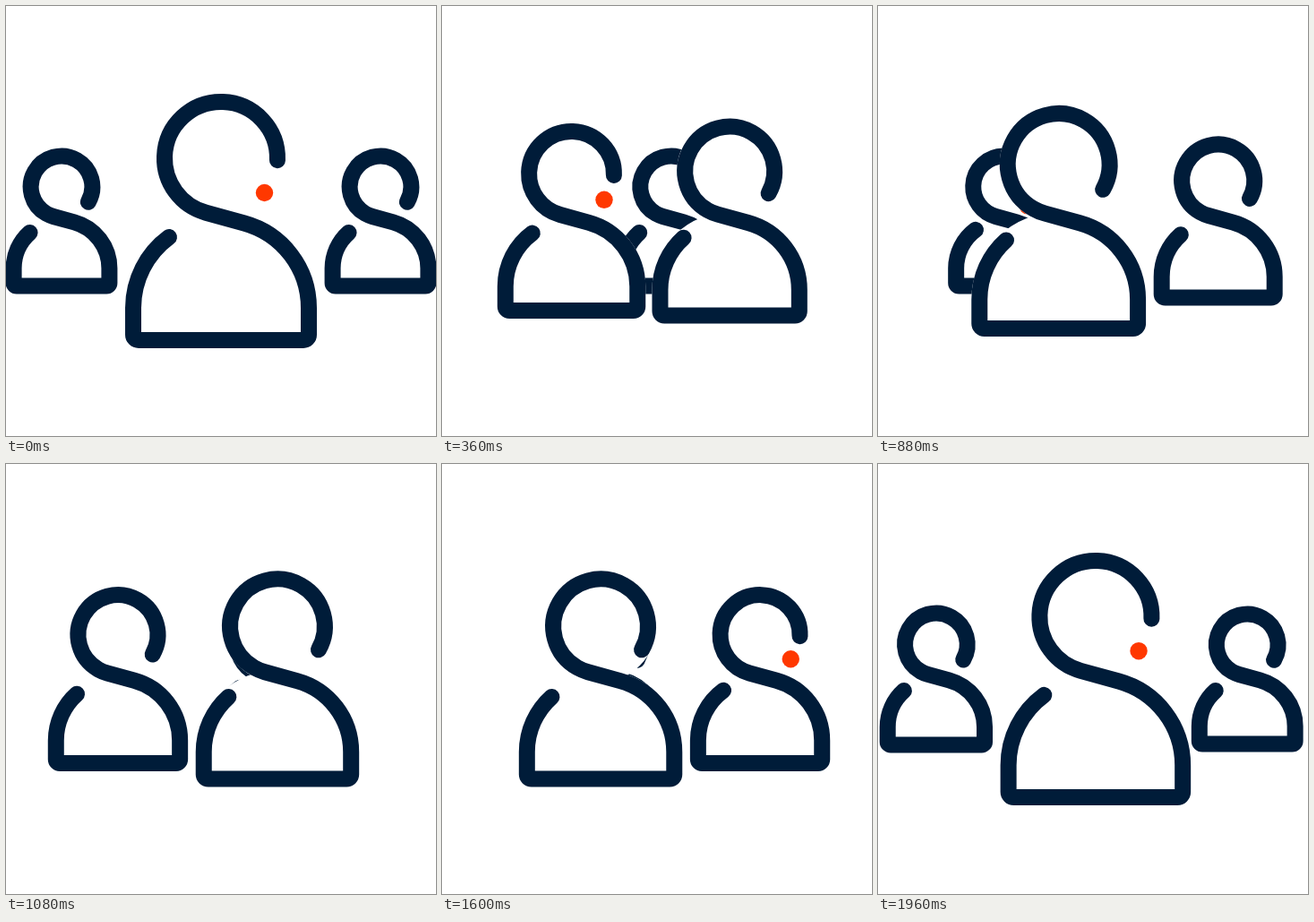
Animation, 480 px wide and 480 px high, one loop 2000 ms. Source, as an HTML page with a canvas:

```html
<!DOCTYPE html>
<html lang="en">
<head>
<meta charset="utf-8">
<title>Rotating team</title>
<style>
  html, body { margin: 0; width: 100%; height: 100%; overflow: hidden; background: #fff; }
  canvas { display: block; width: 480px; height: 480px; }
</style>
</head>
<body>
<canvas id="stage" width="480" height="480"></canvas>
<script>
const ctx = document.getElementById('stage').getContext('2d');
const NAVY = '#001c39', RED = '#ff3800', WHITE = '#fff';
const LOOP = 2000, STEP = 40, MID = 240, SMALL = 0.545;
const rad = deg => deg * Math.PI / 180;

// Figure measurements at full size, relative to its anchor
const HEAD = { y: -70, r: 63 };
const BODY = { y: 97, r: 98, base: 133, corner: 6 };
// Both circles share an inner tangent that forms the neck
const neck = Math.acos((HEAD.r + BODY.r) / (BODY.y - HEAD.y));

// Slots are visited in the order centre, left, right
const people = [
  { first: 0, xs: [240, 64.5, 418], headEnd: rad(2), armEnd: rad(233.7), dot: true },
  { first: 1, xs: [240, 62, 418], headEnd: rad(29.5), armEnd: rad(228.4) },
  { first: 2, xs: [240, 62, 418], headEnd: rad(29.5), armEnd: rad(228.4) }
];
const sizes = [1, SMALL, SMALL];

const legs = [
  { until: 680, start: 0, span: 680 },
  { until: 1340, start: 680, span: 668 },
  { until: LOOP, start: 1324, span: 688 }
];

const mix = (a, b, p) => a + (b - a) * p;
const smooth = u => u * u * (3 - 2 * u);

function base(x, s) {
  const r = BODY.r * s, bottom = MID + BODY.base * s, c = BODY.corner * s;
  ctx.arcTo(x + r, bottom, x - r, bottom, c);
  ctx.arcTo(x - r, bottom, x - r, MID + BODY.y * s, c);
}

function drawPerson(person, x, s) {
  const headY = MID + HEAD.y * s, headR = HEAD.r * s;
  const bodyY = MID + BODY.y * s, bodyR = BODY.r * s;

  // White backing hides whoever walks behind
  ctx.fillStyle = ctx.strokeStyle = WHITE;
  ctx.beginPath();
  ctx.arc(x, headY, headR, 0, Math.PI * 2);
  ctx.fill();
  ctx.stroke();
  ctx.beginPath();
  ctx.arc(x, bodyY, bodyR, Math.PI, Math.PI * 2);
  base(x, s);
  ctx.closePath();
  ctx.fill();
  ctx.stroke();

  ctx.strokeStyle = NAVY;
  ctx.beginPath();
  ctx.arc(x, headY, headR, person.headEnd, Math.PI / 2 + neck, true);
  ctx.arc(x, bodyY, bodyR, neck - Math.PI / 2, 0);
  base(x, s);
  ctx.arc(x, bodyY, bodyR, Math.PI, person.armEnd);
  ctx.stroke();

  if (person.dot) {
    ctx.fillStyle = RED;
    ctx.beginPath();
    ctx.arc(x + 48.5 * s, MID - 31.5 * s, 9.7, 0, Math.PI * 2);
    ctx.fill();
  }
}

function draw(time) {
  const t = Math.floor((time % LOOP) / STEP) * STEP;
  const i = legs.findIndex(leg => t < leg.until);
  const p = smooth(Math.min(1, (t - legs[i].start) / legs[i].span));

  ctx.fillStyle = WHITE;
  ctx.fillRect(0, 0, 480, 480);
  ctx.lineWidth = 18;
  ctx.lineCap = ctx.lineJoin = 'round';

  // Back to front: crossing, arriving, leaving the centre
  for (const slot of [1, 2, 0]) {
    const person = people.find(q => (q.first + i) % 3 === slot);
    const next = (slot + 1) % 3;
    drawPerson(person, mix(person.xs[slot], person.xs[next], p), mix(sizes[slot], sizes[next], p));
  }
}

const begin = performance.now();
function tick() {
  draw(performance.now() - begin + 2); // small margin for timer rounding
  requestAnimationFrame(tick);
}
tick();
</script>
</body>
</html>
```
